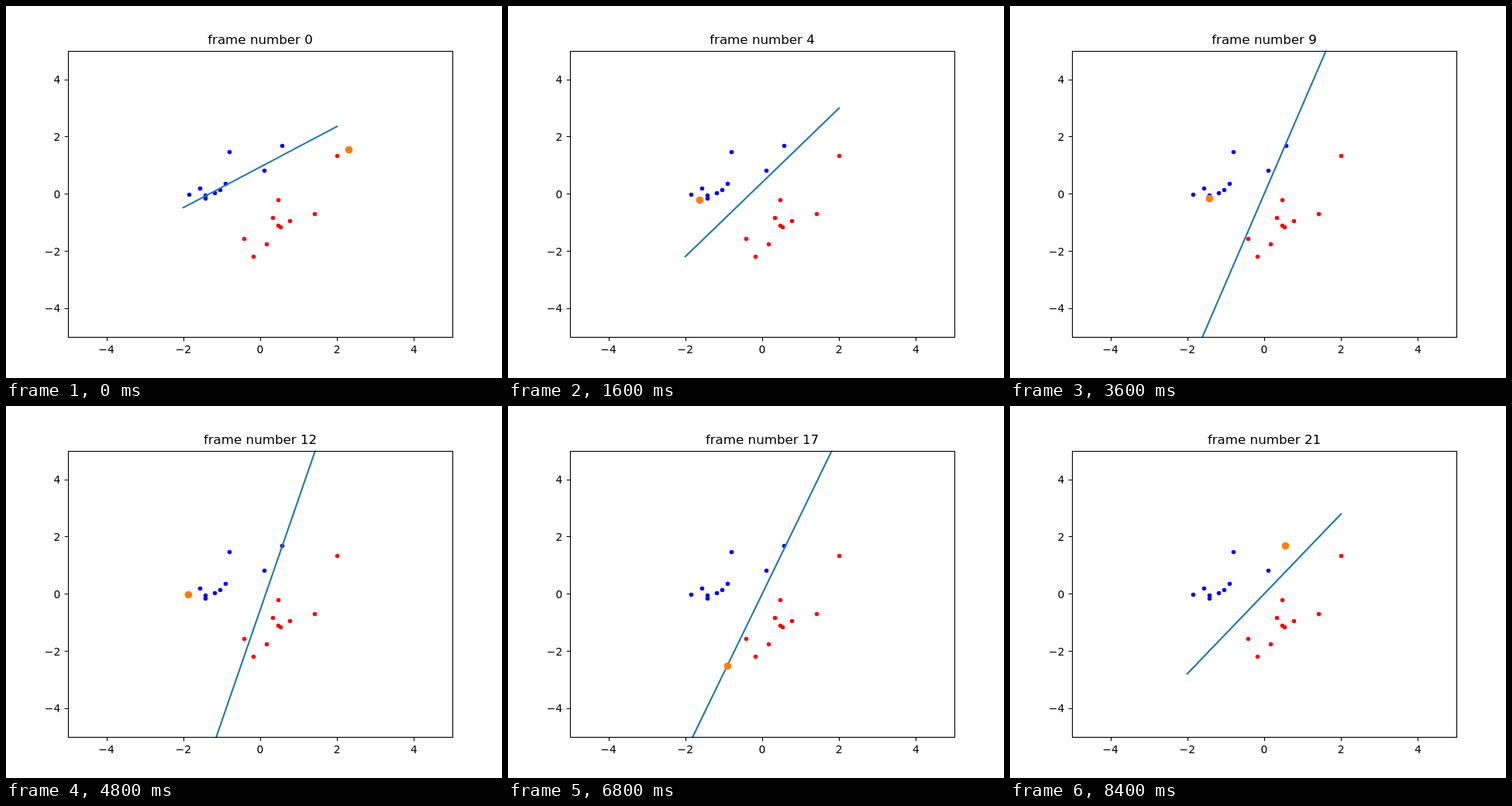
An HTML page for the animation above (8800 ms loop, 640 by 480 pixels).

```html
<!DOCTYPE html>
<html lang="en">
<head>
<meta charset="utf-8">
<title>Linear classifier training</title>
<style>
  html, body { margin: 0; width: 100%; height: 100%; overflow: hidden; background: #fff; }
  svg { display: block; width: 640px; height: 480px; }
  text { font-family: "DejaVu Sans", sans-serif; font-size: 13.89px; fill: #000; }
  #title { font-size: 16.67px; }
  .middle { text-anchor: middle; }
  .end { text-anchor: end; }
  .axis { fill: none; stroke: #000; stroke-width: 1.11; }
</style>
</head>
<body>
<svg id="stage" viewBox="0 0 640 480">
  <defs><clipPath id="plot"><rect x="80" y="57.6" width="496" height="369.6"/></clipPath></defs>
  <g id="dots"></g>
  <g clip-path="url(#plot)">
    <line id="boundary" stroke="#1f77b4" stroke-width="2.083" stroke-linecap="square"/>
  </g>
  <circle id="sample" r="4.86" fill="#ff7f0e"/>
  <g id="axes"><rect class="axis" x="80.5" y="58.5" width="496" height="369"/></g>
  <text id="title" class="middle" x="328" y="49.2"></text>
</svg>
<script>
const STEP_MS = 400;
const BLUE = 1, RED = -1;
const $ = id => document.getElementById(id);
const toX = x => 328 + 49.6 * x;
const toY = y => 242.4 - 36.96 * y;
const pixelCenter = v => Math.floor(v) + 0.5;

function add(parent, tag, attrs, text = "") {
  const node = document.createElementNS("http://www.w3.org/2000/svg", tag);
  for (const key in attrs) node.setAttribute(key, attrs[key]);
  node.textContent = text;
  parent.appendChild(node);
}

function set(node, attrs) {
  for (const key in attrs) node.setAttribute(key, attrs[key]);
}

// Dot centres in stage pixels
const blueDots = [[236, 243], [250, 235], [257, 244], [257, 248], [269, 241],
  [276, 237], [283, 229], [288, 188], [333, 212], [356, 180]];
const redDots = [[427, 193], [351, 250], [344, 273], [351, 283], [354, 285],
  [366, 277], [398, 268], [307, 300], [336, 307], [319, 323]];

// Training samples in data units, one per step
const samples = [
  [2.3, 1.53, RED], [-1.19, 0.04, BLUE], [-1.57, 0.2, BLUE], [0, 0, BLUE],
  [-1.63, -0.23, BLUE], [-1.5, -0.17, BLUE], [0.96, 1.59, RED], [-1.63, -0.75, BLUE],
  [-1.3, 0.5, BLUE], [-1.43, -0.16, BLUE], [-1.43, -0.05, BLUE], [-1.05, 0.13, BLUE],
  [-1.86, -0.02, BLUE], [2, 1.34, RED], [-1.19, 0.04, BLUE], [1.34, 0, RED],
  [-1.11, -1.87, RED], [-0.89, -2.53, RED], [-0.42, -1.56, RED], [0.1, -1.85, RED],
  [0.76, 2.02, BLUE], [0.56, 1.68, BLUE]
];

// Each sample adds its signed coordinates to the weights
const weights = { x: -3, y: 9, bias: -6 };
const steps = samples.map(([x, y, label]) => {
  weights.x += label * x;
  weights.y += label * y;
  weights.bias += label;
  return { x, y, slope: -weights.x / weights.y, intercept: -weights.bias / weights.y };
});

function drawDots(dots, fill) {
  for (const [x, y] of dots) add($("dots"), "circle", { cx: x + 0.5, cy: y + 0.5, r: 2.78, fill });
}

function drawAxes() {
  for (const value of [-4, -2, 0, 2, 4]) {
    const label = String(value).replace("-", "\u2212");
    const x = Math.round(toX(value)) + 0.5;
    const y = Math.round(toY(value)) + 0.5;
    add($("axes"), "path", { class: "axis", d: `M${x} 427.5v4.86M80.5 ${y}h-4.86` });
    add($("axes"), "text", { class: "middle", x: toX(value), y: 447.7 }, label);
    add($("axes"), "text", { class: "end", x: 70.3, y: toY(value) + 5.2 }, label);
  }
}

let shown = -1;
function render(time) {
  const index = Math.floor(time / STEP_MS) % steps.length;
  if (index === shown) return;
  shown = index;
  const { x, y, slope, intercept } = steps[index];
  set($("boundary"), {
    x1: toX(-2), y1: toY(intercept - 2 * slope),
    x2: toX(2), y2: toY(intercept + 2 * slope)
  });
  set($("sample"), { cx: pixelCenter(toX(x)), cy: pixelCenter(toY(y)) });
  $("title").textContent = `frame number ${index}`;
}

drawDots(blueDots, "#00f");
drawDots(redDots, "#f00");
drawAxes();
render(0);

const start = performance.now();
function tick() {
  render(performance.now() - start);
  requestAnimationFrame(tick);
}
requestAnimationFrame(tick);
</script>
</body>
</html>
```
